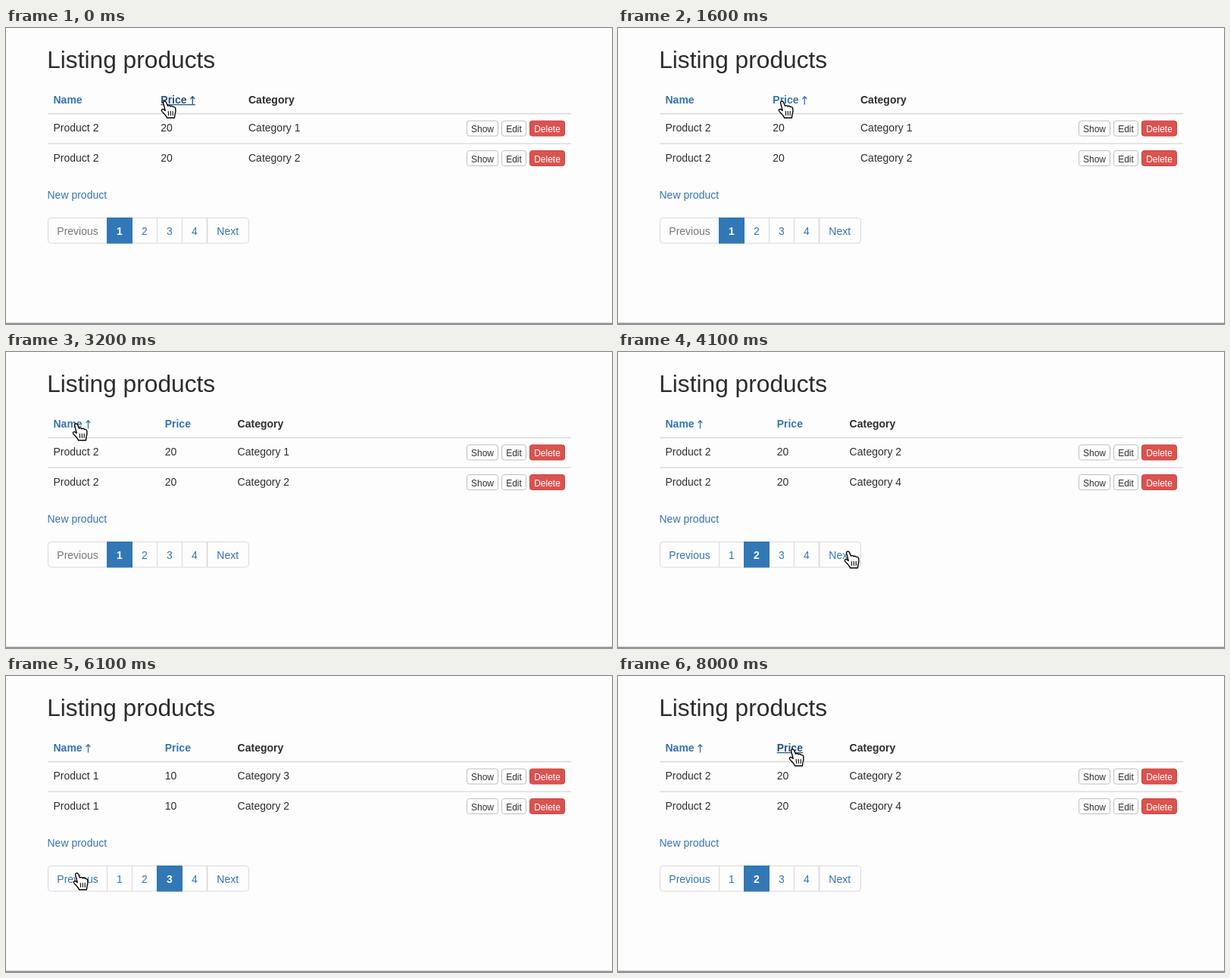
Recreate the animation shown at these times as an HTML page. Size 800 px wide and 392 px high, loop 8.1 s.

```html
<!DOCTYPE html>
<html lang="en">
<head>
<meta charset="utf-8">
<title>Listing products</title>
<style>
  html, body { margin: 0; width: 100%; height: 100%; overflow: hidden; background: #fdfdfe; }
  svg { display: block; width: 800px; height: 392px; }
  text { font: 14px "Liberation Sans", Arial, sans-serif; fill: #2d2d30; white-space: pre; }
  .title { font-size: 31.7px; }
  .head { font-weight: 700; }
  .link { fill: #3673ae; }
  .hover { fill: #23527c; }
  .muted { fill: #777; }
  .white { fill: #fff; }
  .small { font-size: 12px; }
  .mid { text-anchor: middle; }
</style>
</head>
<body>
<svg viewBox="0 0 800 392">
  <g id="page"></g>
  <g id="hand" stroke="#000" stroke-linecap="round" stroke-linejoin="round">
    <path fill="#fff" stroke-width="1.4" d="M-2.4 2.4C-3 .2 .2-1.1 1.4 1.2L3.6 6.2C5 5.2 6.6 5.6 7 6.8C8.6 5.8 10 6.4 10.4 7.6C12.2 6.8 13.6 8 13.8 9.8C14.2 13 14.2 15 13 17.4L12.4 22H2.6C2 19.6-1 17-4 13.6C-5.6 11.6-3.8 9.8-1.6 11L.2 12.4Z"/>
    <path fill="none" stroke-width="1.1" d="M4.2 13.2L4.6 18.4M7.2 13.2L7.4 18.4M10.2 13.2V18.4"/>
  </g>
</svg>
<script>
const LOOP = 8100, TICK = 100;

// time, sorted column, arrow, page number, hovered link
const steps = [
  [0, 'price', 'up', 1, 'price'],
  [600, 'price', 'down', 1, ''],
  [900, 'price', 'down', 1, 'price'],
  [1300, 'price', 'up', 1, ''],
  [2100, 'price', 'up', 1, 'name'],
  [2300, 'name', 'down', 1, ''],
  [2600, 'name', 'down', 1, 'name'],
  [2900, 'name', 'up', 1, ''],
  [3700, 'name', 'up', 1, 'next'],
  [3900, 'name', 'up', 2, ''],
  [4400, 'name', 'up', 2, 'next'],
  [4700, 'name', 'up', 3, ''],
  [5000, 'name', 'up', 3, 'next'],
  [5300, 'name', 'up', 4, ''],
  [5700, 'name', 'up', 4, 'prev'],
  [5900, 'name', 'up', 3, ''],
  [6400, 'name', 'up', 3, 'prev'],
  [6800, 'name', 'up', 2, ''],
  [7700, 'name', 'up', 2, 'price']
];

// time and fingertip position
const moves = [
  [0, 210, 97], [700, 210, 97], [1200, 217, 97], [1700, 217, 97],
  [2100, 94, 96], [3300, 93, 95], [3600, 300, 275], [3800, 304, 264],
  [5300, 304, 264], [5700, 94, 262], [6100, 94, 261], [6900, 94, 261],
  [7700, 228, 98], [7900, 231, 97], [LOOP, 231, 97]
];

// category numbers of the two rows on each page
const categories = { 1: [1, 2], 2: [2, 4], 3: [3, 2], 4: [1, 4] };

const page = document.getElementById('page');
const hand = document.getElementById('hand');

const text = (x, y, s, cls = '') => `<text x="${x}" y="${y}" class="${cls}">${s}</text>`;
const rect = (x, y, w, h, fill, extra = '') =>
  `<rect x="${x}" y="${y}" width="${w}" height="${h}" fill="${fill}" ${extra}/>`;
const stroke = (d, color, width = 1) =>
  `<path d="${d}" fill="none" stroke="${color}" stroke-width="${width}"/>`;

function button(x, y, w, label, danger) {
  const line = danger ? '#d0403b' : '#bdbdbd';
  return rect(x, y, w, 20, danger ? '#d9534f' : '#fff', `rx="3" stroke="${line}"`) +
    text(x + w / 2, y + 15, label, danger ? 'small mid white' : 'small mid');
}

function sortLink(x, label, width, arrow, hovered) {
  const color = hovered ? '#23527c' : '#3673ae';
  const ax = x + width + 7.5;
  let out = text(x, 100, label, 'head ' + (hovered ? 'hover' : 'link'));
  if (arrow) {
    const head = arrow === 'up' ? `M${ax - 2.8} 94l2.8-3.3l2.8 3.3` : `M${ax - 2.8} 98l2.8 3.3l2.8-3.3`;
    out += stroke(`M${ax} 91V101.5` + head, color, 1.3);
  }
  if (hovered) out += rect(x, 101, arrow ? width + 11 : width, 1.2, color);
  return out;
}

function row(y, kind, category, priceX, categoryX) {
  return text(62.5, y + 5, 'Product ' + kind) +
    text(priceX, y + 5, kind * 10) +
    text(categoryX, y + 5, 'Category ' + category) +
    button(608.5, y - 9, 41, 'Show') +
    button(654.5, y - 9, 32, 'Edit') +
    button(691.5, y - 9, 46, 'Delete', true);
}

function pager(current, hover) {
  const edge = n => 100.5 + 33 * n;
  const cls = (key, off) => off ? 'muted' : hover === key ? 'hover' : 'link';
  let out = '';
  if (hover === 'prev') out += rect(56, 252, 77, 33, '#eee');
  if (hover === 'next') out += rect(266, 252, 54, 33, '#eee');
  out += rect(55.5, 251.5, 265, 33.5, 'none', 'rx="4" stroke="#d9d9dc"');
  for (let n = 1; n <= 5; n++) {
    out += stroke(`M${edge(n)} 251.5V285`, '#d9d9dc', n === 5 ? 1.8 : 1);
  }
  out += rect(edge(current) - .5, 251, 34, 34.5, '#3277b6');
  out += text(67.3, 274, 'Previous', cls('prev', current === 1));
  for (let n = 1; n <= 4; n++) {
    out += text(edge(n) + 16.5, 274, n, n === current ? 'mid head white' : 'mid link');
  }
  return out + text(278.3, 274, 'Next', cls('next', current === 4));
}

function draw([, sort, arrow, current, hover]) {
  const byName = sort === 'name';
  const priceX = byName ? 209.7 : 204.3;
  const categoryX = byName ? 305.6 : 320;
  const kind = (arrow === 'up') === (current < 3) ? 2 : 1;
  const [first, second] = categories[current];
  page.innerHTML =
    text(54.2, 52.5, 'Listing products', 'title') +
    sortLink(62.5, 'Name', 38.5, byName && arrow, hover === 'name') +
    sortLink(priceX, 'Price', 34.5, !byName && arrow, hover === 'price') +
    text(categoryX, 100, 'Category', 'head') +
    stroke('M55 113.5H746', '#d8d8da', 1.5) +
    row(132, kind, first, priceX, categoryX) +
    stroke('M55 153.2H746', '#d8d8da', 1.2) +
    row(171.5, kind, second, priceX, categoryX) +
    text(54.5, 226, 'New product', 'link') +
    pager(current, hover) +
    rect(0, 390.5, 800, 1.5, '#8b8b8d');
}

function place(t) {
  const i = moves.findIndex(m => m[0] > t);
  const [t0, x0, y0] = moves[i - 1], [t1, x1, y1] = moves[i];
  const p = (t - t0) / (t1 - t0), e = p * p * (3 - 2 * p);
  hand.setAttribute('transform', `translate(${x0 + (x1 - x0) * e} ${y0 + (y1 - y0) * e})`);
}

let shown;
const start = performance.now();

function frame(now) {
  const t = Math.floor((Math.max(0, now - start) % LOOP) / TICK) * TICK;
  const step = steps.filter(s => s[0] <= t).pop();
  if (step !== shown) draw(shown = step);
  place(t);
  requestAnimationFrame(frame);
}
frame(start);
</script>
</body>
</html>
```
